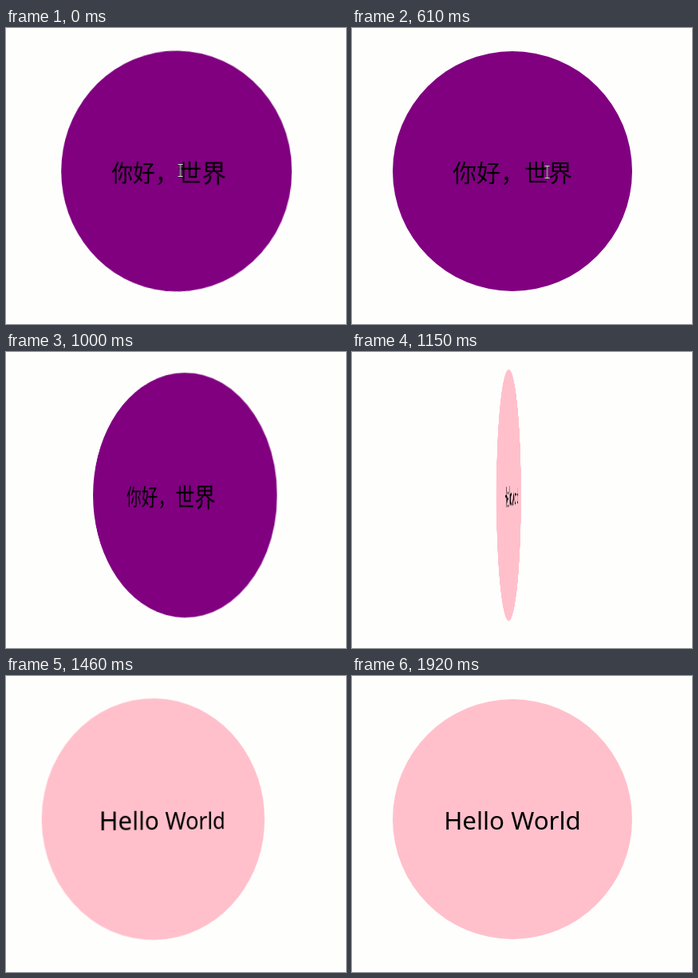
An HTML page for the animation above (2760 ms loop, 426 by 370 pixels).

```html
<!DOCTYPE html>
<html lang="zh-CN">
<head>
<meta charset="utf-8">
<title>Flip card</title>
<style>
  html, body {
    margin: 0;
    width: 100%;
    height: 100%;
    overflow: hidden;
    background: #fefefd;
  }
  .stage {
    position: fixed;
    inset: 0;
    overflow: hidden;
    contain: strict;
  }
  .scene {
    position: absolute;
    left: 51px;
    top: 29px;
    width: 300px;
    height: 300px;
    perspective: 500px;
  }
  .card, .face {
    position: absolute;
    inset: 0;
  }
  .card {
    transform-style: preserve-3d;
    animation:
      unflip 1140ms ease -720ms paused,
      flip 1140ms ease 802ms forwards paused;
  }
  .face {
    border-radius: 50%;
    backface-visibility: hidden;
    color: #000;
    text-align: center;
    white-space: nowrap;
  }
  .front {
    background: #800080;
    font: 300 30px/300px "Noto Sans CJK SC", "Noto Sans CJK", sans-serif;
  }
  .back {
    background: #ffc0cb;
    font: 31.3px/302px "Noto Sans", "Open Sans", sans-serif;
    transform: rotateY(180deg);
  }
  .beam {
    position: absolute;
    left: -6px;
    top: -10px;
    width: 12px;
    height: 20px;
    visibility: hidden;
    fill: none;
    animation: drift 750ms linear paused;
  }
  @keyframes flip {
    from { transform: rotateY(0deg); }
    to { transform: rotateY(-180deg); }
  }
  @keyframes unflip {
    from { transform: rotateY(-180deg); }
    to { transform: rotateY(0deg); }
  }
  @keyframes drift {
    0% {
      visibility: visible;
      transform: translate(218.5px, 178px);
      animation-timing-function: ease-in;
    }
    82% { visibility: visible; transform: translate(244.5px, 180px); }
    100% { visibility: visible; transform: translate(266px, 182px); }
  }
</style>
</head>
<body>
<div class="stage">
  <div class="scene">
    <div class="card">
      <div class="face front">你好，世界</div>
      <div class="face back" lang="en">Hello World</div>
    </div>
  </div>
  <svg class="beam" viewBox="-6 -10 12 20">
    <path d="M-3 -7.5H3M0 -7.5V7.5M-3 7.5H3" stroke="#222" stroke-width="2.4"/>
    <path d="M-3 -7.5H3M0 -7.5V7.5M-3 7.5H3" stroke="#ddd"/>
  </svg>
</div>
<script>
  const LOOP = 2760, FPS = 13;
  const animations = document.getAnimations();
  const start = performance.now();

  // The motion advances in steps of 1/13 s, then rests until the loop ends.
  function draw() {
    const t = (performance.now() - start) % LOOP;
    const step = Math.floor((t + 8) * FPS / 1000);
    const time = Math.min(step, 26) * 1000 / FPS;
    for (const a of animations) a.currentTime = time;
    requestAnimationFrame(draw);
  }
  draw();
</script>
</body>
</html>
```
